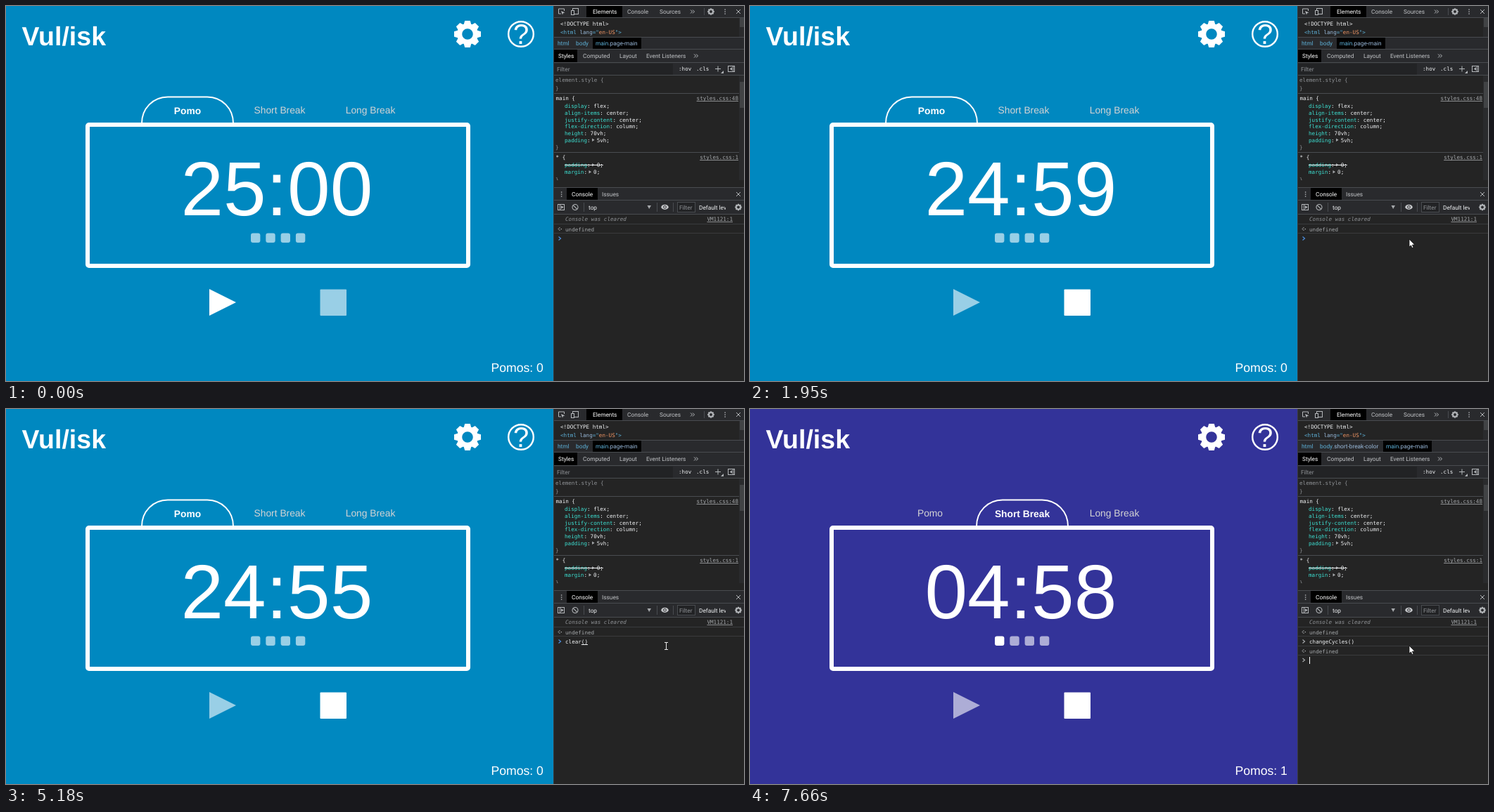
These frames come from a looping animation (1049 by 534 pixels, 8 s). An HTML page with a canvas:

```html
<!DOCTYPE html>
<html lang="en">
<head>
<meta charset="utf-8">
<title>Timer</title>
<style>
html, body { margin: 0; width: 100%; height: 100%; overflow: hidden; background: #242424; }
canvas { display: block; width: 1049px; height: 534px; }
</style>
</head>
<body>
<canvas id="stage" width="1049" height="534"></canvas>
<script>
const ctx = document.getElementById('stage').getContext('2d');
ctx.textRendering = 'geometricPrecision';

const LOOP = 8000;
const SANS = '"Liberation Sans", Arial, sans-serif';
const UI = '8.3px Roboto, "Open Sans", sans-serif';
const MONO = '7.6px "DejaVu Sans Mono", monospace';
const BLUE = '#5db0d7', PALE = '#9bbbdc', CYAN = '#3de0d2', LIGHT = '#f0f2f4', GREY = '#8f9296';
const ICON = '#b4b7ba', LINE = '#494c50', THUMB = '#414345', TRACK = '#2a2b2d';

function rect(x, y, w, h, color) {
  ctx.fillStyle = color;
  ctx.fillRect(x, y, w, h);
}

function text(s, x, y, color, font, align = 'left') {
  ctx.font = font;
  ctx.textAlign = align;
  ctx.fillStyle = color;
  ctx.fillText(s, x, y);
  return ctx.measureText(s).width;
}

// Draws [string, colour] pairs one after another.
function run(parts, x, y, font) {
  for (const [s, color] of parts) x += text(s, x, y, color, font);
}

function poly(points, fill, stroke, width = 1) {
  ctx.beginPath();
  points.forEach(([x, y], i) => i ? ctx.lineTo(x, y) : ctx.moveTo(x, y));
  if (fill) { ctx.closePath(); ctx.fillStyle = fill; ctx.fill(); }
  if (stroke) { ctx.strokeStyle = stroke; ctx.lineWidth = width; ctx.stroke(); }
}

function ring(x, y, r, color, width) {
  ctx.beginPath();
  ctx.arc(x, y, r, 0, Math.PI * 2);
  ctx.strokeStyle = color;
  ctx.lineWidth = width;
  ctx.stroke();
}

function frame(x, y, w, h, color) {
  ctx.strokeStyle = color;
  ctx.lineWidth = 1;
  ctx.strokeRect(x + .5, y + .5, w - 1, h - 1);
}

function round(x, y, w, h, r, color) {
  ctx.beginPath();
  ctx.roundRect(x, y, w, h, r);
  ctx.fillStyle = color;
  ctx.fill();
}

function gear(x, y, r, color) {
  ctx.save();
  ctx.translate(x, y);
  ring(0, 0, r * 0.6, color, r * 0.38);
  for (let i = 0; i < 8; i++) {
    poly([[-r * .29, -r * .68], [-r * .2, -r], [r * .2, -r], [r * .29, -r * .68]], color);
    ctx.rotate(Math.PI / 4);
  }
  ctx.restore();
}

function cross(x, y) {
  poly([[x - 3, y - 3], [x + 3, y + 3]], null, ICON);
  poly([[x + 3, y - 3], [x - 3, y + 3]], null, ICON);
}

function kebab(x, y) {
  for (let i = -1; i < 2; i++) rect(x - .6, y + i * 3 - .6, 1.4, 1.4, ICON);
}

function chevrons(x, y) {
  for (const d of [0, 3]) poly([[x + d, y - 2.5], [x + d + 2.5, y], [x + d, y + 2.5]], null, ICON);
}

function tab(label, x, mid, active) {
  if (!active) {
    text(label, mid, 153, '#d3d3d3', '13.8px ' + SANS, 'center');
    return;
  }
  const top = 129.5;
  ctx.beginPath();
  ctx.moveTo(x + 1, 167);
  ctx.bezierCurveTo(x + 1, 146, x + 17, top, x + 38, top);
  ctx.lineTo(x + 94, top);
  ctx.bezierCurveTo(x + 115, top, x + 131, 146, x + 131, 167);
  ctx.strokeStyle = '#fff';
  ctx.lineWidth = 2;
  ctx.stroke();
  text(label, x + 66, 154, '#fff', 'bold 13.8px ' + SANS, 'center');
}

function clock(t) {
  if (t >= 6600) return t < 7640 ? '04:59' : '04:58';
  const ticks = [920, 2200, 3160, 4190, 5180, 6180].filter(k => t >= k).length;
  return ticks ? '24:' + (60 - ticks) : '25:00';
}

function drawTimer(t) {
  const rest = t >= 6600, running = t >= 840;
  const faded = 'rgba(255,255,255,.6)';
  rect(0, 0, 778, 534, rest ? '#333399' : '#0088c0');
  text('Vul/isk', 22.5, 55.5, '#fff', 'bold 37.5px ' + SANS);
  gear(656, 40, 19, '#fff');
  ring(732, 40, 17.8, '#fff', 2.4);
  text('?', 732, 54, '#fff', '40px ' + SANS, 'center');

  tab('Pomo', 192, 256, !rest);
  tab('Short Break', 321, 389, rest);
  tab('Long Break', 450, 518, false);
  ctx.strokeStyle = '#fff';
  ctx.lineWidth = 6;
  ctx.beginPath();
  ctx.roundRect(116, 169, 541, 201, 2);
  ctx.stroke();

  text(clock(t), 248.5, 298, '#fff', '109px ' + SANS);
  for (let i = 0; i < 4; i++) {
    round(348 + i * 21.3, 323.5, 13.4, 13.4, 3, rest && !i ? '#fff' : faded);
  }
  poly([[289, 403], [327, 422], [289, 441]], running ? faded : '#fff');
  round(446.5, 403.5, 37.5, 37.5, 1, running ? '#fff' : faded);
  text('Pomos: ' + (rest ? 1 : 0), 689.5, 521, '#fff', '17.6px ' + SANS);
}

function drawElements(t) {
  rect(778, 0, 271, 534, '#242424');
  rect(778, 0, 271, 16, '#292a2d');
  rect(825, 0, 51, 16, '#000');
  poly([[789, 11], [785.5, 11], [785.5, 4], [793.5, 4], [793.5, 7]], null, ICON);
  poly([[789, 7], [794.5, 9.5], [792, 10], [791, 12.5]], ICON);
  frame(805, 3, 9, 9, ICON);
  rect(803, 6, 5, 7, '#292a2d');
  frame(803, 6, 5, 7, ICON);
  text('Elements', 834, 11, '#fff', UI);
  text('Console', 883, 11, '#c3c5c8', UI);
  text('Sources', 929, 11, '#c3c5c8', UI);
  chevrons(973, 8);
  rect(992, 3, 1, 10, LINE);
  gear(1002, 8, 4.8, ICON);
  kebab(1022, 8);
  cross(1041, 8);
  rect(778, 16, 271, 1, LINE);

  text('<!DOCTYPE html>', 788, 28, LIGHT, MONO);
  run([['<html ', BLUE], ['lang', PALE], ['="', BLUE], ['en-US', '#f29766'], ['">', BLUE]], 788, 39.5, MONO);
  rect(1042, 17, 7, 28, TRACK);
  rect(1043, 17, 6, 13, THUMB);

  rect(778, 45, 271, 17, '#292a2d');
  rect(778, 44, 271, 1, LINE);
  const wide = t >= 6700, box = wide ? 900 : 834;
  text('html', 784, 56, BLUE, UI);
  run([['body', BLUE], [wide ? '.short-break-color' : '', PALE]], 810, 56, UI);
  rect(box, 45, 69, 17, '#000');
  run([['main', BLUE], ['.page-main', PALE]], box + 4, 56, UI);
  rect(778, 61, 271, 1, LINE);
}

function prop(name, value, y, arrow, struck) {
  const x = 794;
  let end = x + text(name, x, y, CYAN, MONO);
  end += text(':', end, y, LIGHT, MONO);
  if (arrow) {
    poly([[end + 2.5, y - 5], [end + 6, y - 2.7], [end + 2.5, y - .4]], '#a5a8ab');
    end += 4.5;
  }
  end += text(' ' + value + ';', end, y, LIGHT, MONO);
  if (struck) rect(x, y - 3, end - x, 1, LIGHT);
}

function link(s, right, y) {
  const w = text(s, right, y, '#a5a8ab', MONO, 'right');
  rect(right - w, y + 1, w, .8, '#a5a8ab');
}

function drawStyles() {
  rect(778, 62, 271, 18, '#292a2d');
  rect(779, 62, 33, 18, '#000');
  text('Styles', 785, 74, '#fff', UI);
  text('Computed', 820, 74, '#c3c5c8', UI);
  text('Layout', 872, 74, '#c3c5c8', UI);
  text('Event Listeners', 910, 74, '#c3c5c8', UI);
  chevrons(978, 71);
  rect(778, 80, 271, 1, LINE);
  rect(778, 81, 271, 18, '#292a2d');
  rect(779, 82, 169, 16, '#222325');
  text('Filter', 783, 93, GREY, UI);
  text(':hov', 956, 92, LIGHT, MONO);
  text('.cls', 981, 92, LIGHT, MONO);
  rect(1008, 89, 8, 1, ICON);
  rect(1011.5, 85.5, 1, 8, ICON);
  poly([[1020, 92], [1020, 96], [1016, 96]], ICON);
  frame(1026, 85, 10, 9, ICON);
  poly([[1032, 87], [1029, 89.5], [1032, 92]], ICON);
  rect(1033, 86, 1, 8, ICON);
  rect(778, 98, 271, 1, LINE);

  text('element.style {', 781, 108, GREY, MONO);
  text('}', 781, 119.5, GREY, MONO);
  rect(778, 124, 264, 1, LINE);
  text('main {', 781.5, 134, LIGHT, MONO);
  link('styles.css:48', 1041, 134);
  prop('display', 'flex', 145);
  prop('align-items', 'center', 155);
  prop('justify-content', 'center', 164.5);
  prop('flex-direction', 'column', 174);
  prop('height', '70vh', 184);
  prop('padding', '5vh', 193.5, true);
  text('}', 781, 204, GREY, MONO);
  rect(778, 208, 264, 1, LINE);
  text('* {', 781.5, 218, LIGHT, MONO);
  link('styles.css:1', 1041, 218);
  prop('padding', '0', 229, true, true);
  prop('margin', '0', 239, true);
  text('}', 781, 249.5, GREY, MONO);
  rect(778, 248, 271, 10, '#242424');
  rect(1042, 99, 7, 149, TRACK);
  rect(1043, 108, 6, 37, THUMB);
}

function prompt(y, color) {
  poly([[785.5, y - 2.5], [788.5, y], [785.5, y + 2.5]], null, color, 1.2);
}

function result(y) {
  poly([[787.5, y - 2.5], [785, y], [787.5, y + 2.5]], null, '#a5a8ab');
  rect(788.5, y - .5, 1.5, 1.2, '#a5a8ab');
  text('undefined', 795, y + 3, '#a5a8ab', MONO);
}

function caretOn(t) {
  if (t < 2230) return false;
  const flips = [2730, 3210, 3700, 4190, 4700, 5230, 5760, 5800, 6330, 6630, 7100, 7660];
  return flips.filter(k => t >= k).length % 2 === 0;
}

function drawConsole(t) {
  rect(778, 258, 271, 19, '#292a2d');
  rect(778, 258, 271, 1, LINE);
  kebab(789.5, 268);
  rect(797, 259, 44, 18, '#000');
  text('Console', 804, 271, '#fff', UI);
  text('Issues', 847, 271, '#c3c5c8', UI);
  cross(1041, 268);
  rect(778, 276, 271, 1, LINE);
  rect(778, 277, 271, 19, '#292a2d');

  frame(784, 282, 10, 9, ICON);
  rect(787, 283, 1, 7, ICON);
  poly([[789, 284], [792.5, 286.5], [789, 289]], ICON);
  ring(809, 286.5, 4, ICON, 1.1);
  poly([[806.2, 283.7], [811.8, 289.3]], null, ICON, 1.1);
  rect(821, 280, 1, 13, LINE);
  text('top', 828, 289.5, LIGHT, UI);
  poly([[911.5, 284], [917, 284], [914.2, 289]], '#a5a8ab');
  rect(925, 280, 1, 13, LINE);
  ctx.beginPath();
  ctx.ellipse(936.5, 286.3, 5.2, 3.6, 0, 0, Math.PI * 2);
  ctx.fillStyle = '#c3c5c8';
  ctx.fill();
  ring(936.5, 286.3, 1.9, '#292a2d', 1);
  rect(948, 280, 1, 13, LINE);
  rect(954, 279, 26, 15, '#222325');
  frame(954, 279, 26, 15, LINE);
  text('Filter', 957, 290, GREY, UI);
  ctx.save();
  ctx.beginPath();
  ctx.rect(984, 278, 39, 17);
  ctx.clip();
  text('Default levels', 985, 289.5, LIGHT, UI);
  ctx.restore();
  gear(1041, 286.5, 4.8, ICON);
  rect(778, 296, 271, 1, LINE);

  text('Console was cleared', 795, 306, GREY, 'italic ' + MONO);
  link('VM1121:1', 1033, 306);
  rect(778, 310, 271, 1, '#3a3b3d');
  result(317.5);
  rect(778, 323, 271, 1, '#3a3b3d');

  const sent = t >= 6630;
  let word = '';
  if (t >= 3210) word = 'clear';
  if (t >= 5800) word = 'changeCycles';
  let x = 795;
  prompt(331, sent ? '#a5a8ab' : '#4d8fe0');
  if (word) {
    text(word + '()', x, 333.5, LIGHT, MONO);
    const step = ctx.measureText('0').width;
    x += step * (word.length + 2);
    if (!sent) rect(x - step * 2, 335, step * 2, 1, LIGHT);
  }
  if (sent) {
    rect(778, 337, 271, 1, '#3a3b3d');
    result(344.5);
    rect(778, 350, 271, 1, '#3a3b3d');
    prompt(357.5, '#a5a8ab');
    x = 795;
  }
  if (caretOn(t)) rect(Math.floor(x), sent ? 353 : 326, 1, 10, '#fff');
}

const PATH = [
  [110, 793, 504], [460, 196, 430], [800, 306, 424], [1110, 306, 424],
  [1500, 966, 330], [1670, 941, 340], [1890, 941, 340], [1950, 937, 332], [2290, 937, 332]
];

function along(t) {
  let i = 1;
  while (i < PATH.length - 1 && t > PATH[i][0]) i++;
  const [t0, x0, y0] = PATH[i - 1], [t1, x1, y1] = PATH[i];
  const k = Math.min(1, Math.max(0, (t - t0) / (t1 - t0)));
  const e = k * k * (3 - 2 * k);
  return [x0 + (x1 - x0) * e, y0 + (y1 - y0) * e];
}

function arrow() {
  poly([[0, 0], [0, 11], [2.5, 8.9], [4.2, 12.6], [6, 11.8], [4.4, 8.2], [7.8, 8], [0, 0]], '#fff', '#111', .8);
}

function hand() {
  poly([[-1.5, 1], [0, 0], [1.5, 1], [1.5, 5], [7, 6.5], [7.5, 11], [6, 16], [-1, 16], [-5, 10], [-4, 8.5], [-1.5, 10], [-1.5, 1]],
    '#fff', '#111', .8);
}

function beam() {
  rect(-.5, -5, 1, 11, '#e8e8e8');
  for (const y of [-5, 5]) {
    rect(-2.5, y, 2, 1, '#e8e8e8');
    rect(.5, y, 2, 1, '#e8e8e8');
  }
}

function drawCursor(t) {
  if (t < 110) return;
  const typing = t >= 2290 && t < 6600;
  const [x, y] = typing ? [938.5, 337] : t >= 6600 ? [937, 337] : along(t);
  ctx.save();
  ctx.translate(x, y);
  if (typing) beam();
  else if (t >= 720 && t < 950) hand();
  else arrow();
  ctx.restore();
}

function draw(t) {
  drawTimer(t);
  drawElements(t);
  drawStyles();
  drawConsole(t);
  rect(778, 0, 1, 534, '#3a3b3d');
  drawCursor(t);
}

const start = performance.now();
function tick() {
  draw((performance.now() - start) % LOOP);
  requestAnimationFrame(tick);
}
tick();
</script>
</body>
</html>
```
